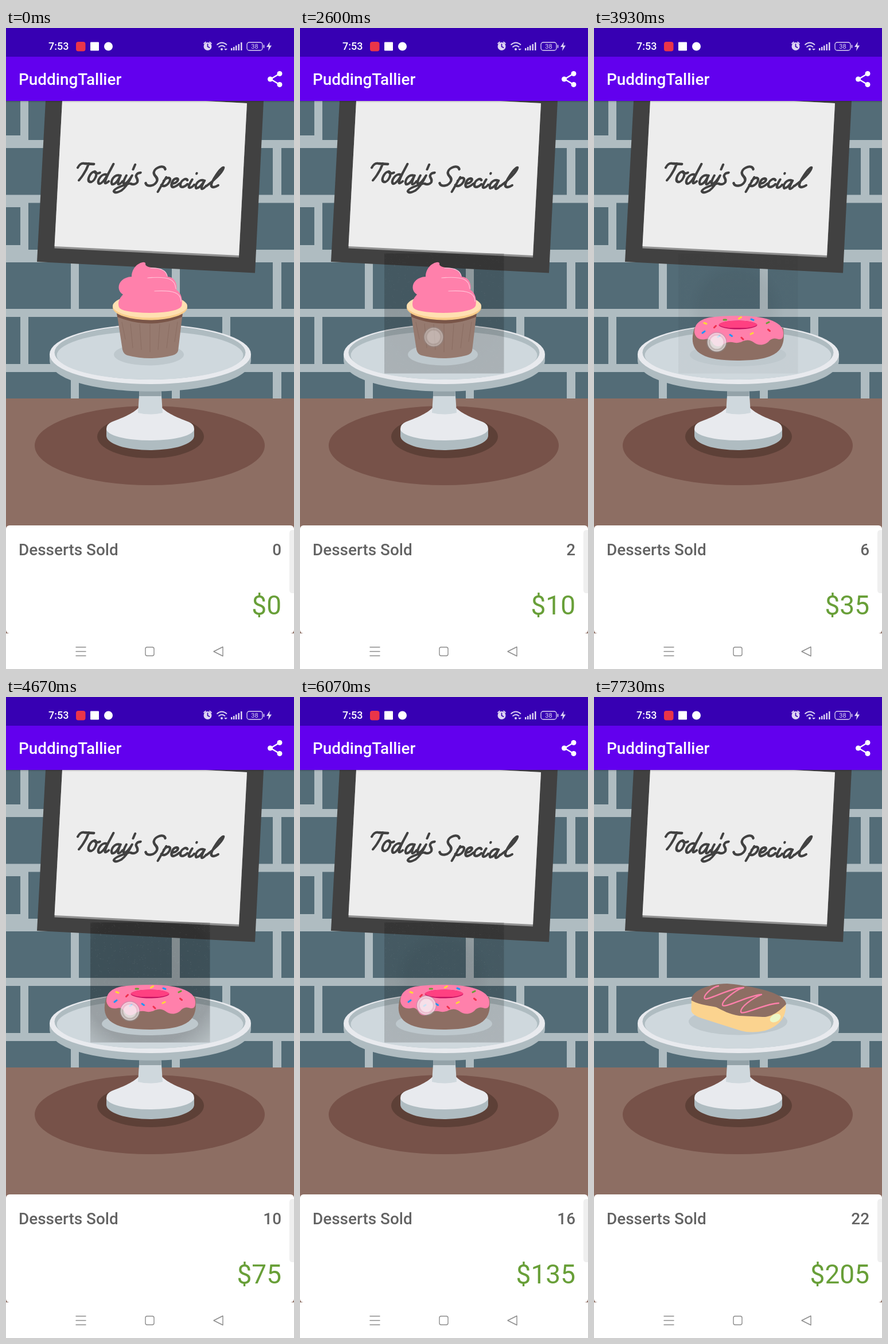
Animation of 502 by 1116 pixels, one loop 8 s. Source, as an HTML page:

```html
<!DOCTYPE html>
<html lang="en">
<head>
<meta charset="utf-8">
<title>Dessert counter</title>
<style>
  html, body { margin: 0; height: 100%; overflow: hidden; background: #fff; }
  svg { display: block; width: 100vw; height: 100vh; }
  text { font-family: Roboto, sans-serif; }
  .medium { font-size: 27.9px; font-weight: 500; }
  .end { text-anchor: end; }
  .line { fill: none; stroke-linecap: round; stroke-linejoin: round; }
</style>
</head>
<body>
<svg viewBox="0 0 502 1116">
  <defs>
    <radialGradient id="soft">
      <stop offset=".3" stop-color="#000"/>
      <stop offset=".7" stop-color="#000" stop-opacity=".95"/>
      <stop offset="1" stop-color="#000" stop-opacity="0"/>
    </radialGradient>
    <linearGradient id="fade" x2="0" y2="1">
      <stop stop-opacity=".2"/>
      <stop offset="1" stop-opacity="0"/>
    </linearGradient>
    <clipPath id="button"><rect x="147" y="392.500" width="208.500" height="209"/></clipPath>
  </defs>

  <!-- wall -->
  <rect width="502" height="650" fill="#536c77"/>
  <path fill="#afbcc1" d="M0 195h502v14H0zM0 290.500h502v14H0zM0 386h502v22H0zM0 489h502v14H0zM0 585h502v14H0z
    M0 187h26v9H0zM0 304h26v8H0zM0 378h26v9H0z
    M25 127h14v70H25zM25 304h14v84H25zM25 502h14v84H25zM465 208h15v84h-15zM465 407h15v84h-15zM465 598h15v48h-15z
    M113 407h14v84h-14zM113 598h14v48h-14zM289 407h14v84h-14zM289 598h14v48h-14zM377 502h14v84h-14z"/>

  <!-- sign -->
  <path fill="#414141" d="M69 127H449L434 426.500 54 407z"/>
  <path fill="#919191" d="M98 127H348L420 131 406 399.500 84.500 383.500z"/>
  <path fill="#ededed" d="M98 127H348L420 131 406 396 84.500 380z"/>
  <path class="line" stroke="#414141" stroke-width="4.300" transform="translate(45) skewX(-10)" d="M123 243q3-9 11-7l16 1M141 236q-3 16-12 29
    M153 250c-8 2-11 17-4 18s12-15 5-18q2 5 9 2M176 256c-9-5-17 11-11 15 5 1 11-10 19-34q-10 27-9 32 1 3 6-2
    M199 257c-10-4-16 10-11 15 5 1 9-6 12-15q-4 14-1 15 3 0 6-5M210 257q-5 13-1 14c5 0 8-8 11-14q-6 20-14 26-10 6-13 1 1-6 24-13
    M222 238l-2 8M234 252q-6 0-7 5c0 4 6 6 4 12q-4 5-11 2
    M276 246c-4-9-19-3-19 5 0 7 10 8 8 16-3 9-16 10-19 3M280 260l-10 25M277 266c5-8 13-6 10 2-3 7-9 9-13 5
    M292 271c10-1 12-9 6-9-7 1-9 14-3 15 4 0 7-3 10-6M318 265c-3-5-11 0-11 7s7 6 12 0M326 264q-6 13-2 14 4 0 7-5M332 253v.5
    M347 266c-9-5-16 8-11 13 5 0 9-7 12-13q-5 13-2 14 3 0 6-5M353 275c10-8 25-25 24-32-5-1-17 24-16 31 2 5 8 3 12 0"/>

  <!-- table and cake stand -->
  <rect y="645" width="502" height="411" fill="#8d6e63"/>
  <ellipse cx="250.500" cy="727" rx="200.500" ry="69" fill="#775249"/>
  <ellipse cx="252" cy="711.500" rx="93" ry="37.500" fill="#5d4037"/>
  <path fill="#afbcc1" d="M175 698v12a76.500 25 0 0 0 153 0v-12z"/>
  <path fill="#e8eaee" d="M230 662C222 671 200 680 184 686Q175 690 175 698A76.500 20 0 0 0 328 698Q328 690 319 686C303 680 281 671 273 662z"/>
  <path fill="#cfd8dd" d="M233 625H270L273 670Q251 675 230 670z"/>
  <path fill="#94a3a9" d="M233 625H270L270.500 641H232z"/>
  <path fill="#afbcc1" d="M76 568v10c0 73 351 73 351 0v-10z"/>
  <ellipse cx="251.500" cy="568" rx="175.500" ry="52" fill="#e8eaee"/>
  <ellipse cx="251" cy="565" rx="166.500" ry="47" fill="#afbcc1"/>
  <ellipse cx="251" cy="570" rx="162.500" ry="42" fill="#cfd8dd"/>

  <g id="ripples" clip-path="url(#button)"></g>

  <!-- desserts -->
  <g class="dessert">
    <ellipse cx="249" cy="568.500" rx="61" ry="19" fill="#bec8cd"/>
    <path fill="#967a6f" d="M193 495H308L300 562Q298 568 290 570 251 580 212 570 205 568 203 560z"/>
    <path fill="#795548" d="M193 495H308L307 503Q251 526 194 503z"/>
    <path class="line" stroke="#8a6d62" stroke-width="1" d="M202 512l6 30M217 515l4 42M233 516l3 44M251 516v48M268 516l-3 44M285 515l-5 42M299 512l-5 34"/>
    <ellipse cx="251" cy="486.500" rx="65" ry="22" fill="#f8cc8a"/>
    <ellipse cx="251" cy="484" rx="65" ry="20.500" fill="#ffe0b2"/>
    <path fill="#ff80ab" d="M238 408Q244 407 243 412C248 422 278 412 282 433 296 434 299 448 297 456 307 462 308 476 306 484Q300 495 251 496 200 495 197 486C194 478 198 470 204 464 190 456 196 434 219 433 219 420 228 410 238 408z"/>
    <path class="line" stroke="#ffc4d8" stroke-width="1.200" d="M252 418q26-1 29 14M247 435c36-3 48 2 49 19M259 458c35-2 46 4 46 18"/>
  </g>
  <g class="dessert">
    <ellipse cx="251" cy="569" rx="84" ry="20" fill="#bec8cd"/>
    <path fill="#8d6e63" d="M175 522C165 556 175 579 251 579 327 579 334 556 330 522z"/>
    <path fill="#ff80ab" d="M201 504Q222 501 251 501C300 501 329 512 330 530Q331 543 322 542 313 538 306 544C297 555 284 552 278 547Q270 541 260 545 251 550 241 547 232 546 225 551C217 557 209 554 206 547Q201 539 193 542 178 544 175 530C175 516 183 508 201 504z"/>
    <ellipse cx="251" cy="517" rx="33.500" ry="7.500" fill="#c51162"/>
    <path fill="#ff4081" d="M217.500 517a33.500 7.500 0 0 1 67 0q-6 4-18 5h-31q-12-1-18-5"/>
    <g class="line" stroke-width="3">
      <path stroke="#fdd835" d="M192 513.500l4 1.500M252.500 506l4-2.500M273 533l4-2"/>
      <path stroke="#689f38" d="M226 508h4.500M301 514l4-2"/>
      <path stroke="#2196f3" d="M274 507l4 1.500M189 531l4-3M237 534l3.500 2.500M216 538l3-2"/>
      <path stroke="#f0304e" d="M209.500 521.500l3-3M257 539l3 3M303.500 525l3 2.500"/>
    </g>
  </g>
  <g class="dessert">
    <ellipse cx="251" cy="565" rx="86" ry="23.500" fill="#bec8cd"/>
    <path fill="#fbd38f" d="M170 525L169.500 546Q171 554 190 560L256 581Q274 586 298 581C325 572 336 556 334 533z"/>
    <path fill="#8d6e63" d="M169.500 528C170 510 203 499 232 499 270 502 334 514 335 535 325 545 310 558 294 557L253 555C235 552 225 546 213 540 197 537 178 534 169.500 528z"/>
    <path class="line" stroke="#ff80ab" stroke-width="2.300" d="M217 503C205 505 190 520 193 525S240 505 261 506C250 508 223 528 224 536S270 519 292 518C275 525 255 540 256 548S300 533 322 533"/>
    <ellipse cx="316" cy="559" rx="10" ry="6.500" transform="rotate(-28 316 559)" fill="#ebf7c8"/>
  </g>

  <!-- score card -->
  <rect y="866" width="502" height="188" rx="6" fill="#fff"/>
  <text class="medium" x="22" y="918" fill="#636363">Desserts Sold</text>
  <text class="medium end" id="sold" x="480" y="918" fill="#636363">0</text>
  <text class="end" id="total" x="480" y="1021" font-size="46" fill="#689f38">$0</text>
  <path fill="#efefef" d="M502 874h-3q-5 0-5 6v98q0 6 5 6h3z"/>

  <!-- navigation bar -->
  <rect y="1054" width="502" height="62" fill="#fff"/>
  <path class="line" stroke="#8c8c8c" stroke-width="1.400" d="M122 1078h17M122 1085.500h17M122 1093h17M246 1078h9q3 0 3 3v9q0 3-3 3h-9q-3 0-3-3v-9q0-3 3-3M378 1077.500v16L362 1085.500z"/>

  <!-- app bar -->
  <rect y="127" width="502" height="3" fill="url(#fade)"/>
  <rect width="502" height="50" fill="#3700b3"/>
  <rect y="50" width="502" height="77" fill="#6200ee"/>
  <text class="medium" x="22" y="99" fill="#fff">PuddingTallier</text>
  <path class="line" stroke="#fff" stroke-width="2.400" d="M477 79.500L461 89l16 9.500"/>
  <g fill="#fff"><circle cx="477" cy="79.500" r="4.500"/><circle cx="460.500" cy="89" r="4.500"/><circle cx="477" cy="98.500" r="4.500"/></g>

  <!-- status bar -->
  <text x="74" y="38" font-size="18" font-weight="500" fill="#fff">7:53</text>
  <rect x="122" y="24" width="16.500" height="16.500" rx="4" fill="#ea3549"/>
  <rect x="147" y="24.500" width="15" height="15" rx="1" fill="#fff"/>
  <circle cx="178.500" cy="32" r="7.500" fill="#fff"/>
  <g fill="#ded5f3">
    <circle cx="351.500" cy="32" r="7"/>
    <path d="M392 35h2.500v4H392zM396 33h2.500v6H396zM400 30.500h2.500v8.500H400zM404.500 28h2.500v11h-2.500zM409 25h2.500v14H409zM460 24l-6 9h4l-1 7 6-9.500h-4z"/>
    <circle cx="376" cy="37" r="2"/>
    <path d="M380 36h6l-3 3z"/>
    <text x="433.500" y="36" font-size="11" text-anchor="middle">38</text>
  </g>
  <g class="line" stroke="#ded5f3" stroke-width="1.700">
    <path d="M345 27l3-2.500M358 27l-3-2.500M368 29q8-7 16.500 0M371 33q5-4.500 10.500 0M449.500 30v4"/>
    <path stroke="#3700b3" d="M351.500 28v4.500l3 1.500"/>
    <rect x="420" y="25" width="27" height="14" rx="4" stroke-width="1.300"/>
  </g>

  <g id="touch">
    <circle r="18" fill="#90a0a8" opacity=".3"/>
    <circle r="15.500" fill="#fff" fill-opacity=".45" stroke="#fff" stroke-opacity=".5" stroke-width="1.500"/>
    <circle r="11.500" fill="#fff" opacity=".5"/>
  </g>
</svg>
<script>
const LOOP = 8000, HOLD = 90;
const releases = [2170, 2500, 2860, 3130, 3380, 3600, 3990, 4200, 4420, 4630, 4840,
  5000, 5150, 5500, 5710, 5920, 6130, 6350, 6560, 6770, 6970, 7180];
const path = [[2600, 233, 538], [3930, 214, 547], [4670, 216, 547], [5470, 215, 545], [6600, 225, 530]];
const menu = [{ from: 0, price: 5 }, { from: 5, price: 10 }, { from: 20, price: 15 }];

const $ = id => document.getElementById(id);
const clamp = v => Math.min(1, Math.max(0, v));
const mix = (a, b, k) => a + (b - a) * k;
const dessertAt = sold => menu.findLastIndex(d => sold >= d.from);

function add(tag, attrs) {
  const el = document.createElementNS('http://www.w3.org/2000/svg', tag);
  set(el, attrs);
  return $('ripples').appendChild(el);
}
function set(el, attrs) {
  for (const key in attrs) el.setAttribute(key, attrs[key]);
}

let seed = 7;
const random = () => (seed = seed * 16807 % 2147483647) / 2147483647;
const ripples = releases.map(() => add('circle', { cx: 248, cy: 488, fill: 'url(#soft)' }));
const specks = add('path', {
  stroke: '#fff',
  d: Array.from({ length: 500 }, () => `M${147 + random() * 208} ${392 + random() * 209}h1`).join('')
});
const desserts = document.querySelectorAll('.dessert');

function finger(t) {
  const next = path.findIndex(p => p[0] > t);
  if (next <= 0) return next ? path.at(-1).slice(1) : path[0].slice(1);
  const [a, b] = [path[next - 1], path[next]];
  const k = (t - a[0]) / (b[0] - a[0]);
  return [mix(a[1], b[1], k), mix(a[2], b[2], k)];
}

function draw(t) {
  let shade = 0, touch = 0;
  releases.forEach((up, i) => {
    const gone = t - up, age = gone + HOLD;
    const alpha = .22 * clamp(age / 150) * clamp(1 - (gone - 50) / 350);
    set(ripples[i], { r: mix(60, 220, clamp(age / 200)), opacity: alpha });
    shade += alpha;
    touch = Math.max(touch, clamp(age / 25) * clamp(1.25 - gone / 150));
  });
  specks.setAttribute('opacity', Math.min(.1, shade * .35));

  const [x, y] = finger(t);
  set($('touch'), { transform: `translate(${x} ${y})`, opacity: touch });

  const sold = releases.filter(up => up <= t).length;
  let total = 0;
  for (let n = 0; n < sold; n++) total += menu[dessertAt(n)].price;
  $('sold').textContent = sold;
  $('total').textContent = '$' + total;
  desserts.forEach((el, i) => el.style.display = i === dessertAt(sold) ? '' : 'none');
}

const start = performance.now();
(function tick() {
  draw((performance.now() - start) % LOOP);
  requestAnimationFrame(tick);
})();
</script>
</body>
</html>
```
